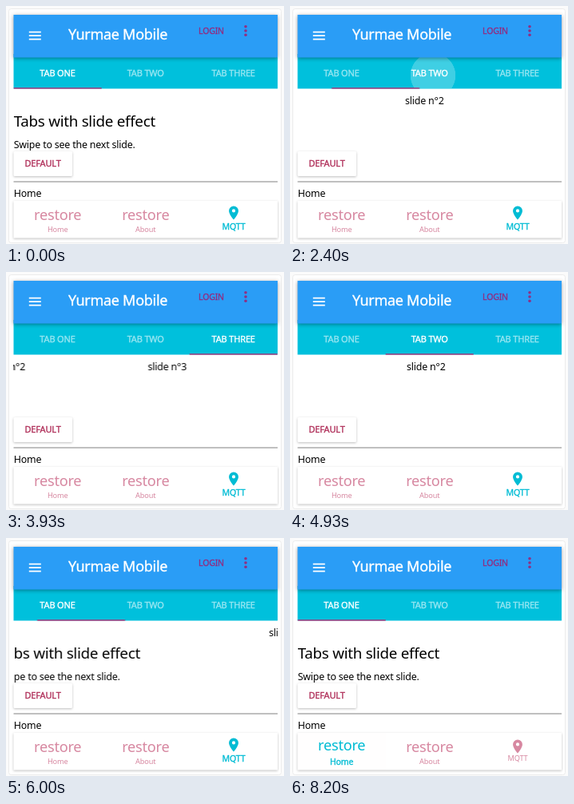
Animation, 348 px wide and 298 px high, one loop 8340 ms. Source, as an HTML page:

```html
<!DOCTYPE html>
<html lang="en">
<head>
<meta charset="utf-8">
<title>Tabs with slide effect</title>
<style>
@property --on { syntax: '<number>'; inherits: true; initial-value: 0; }

html, body { margin: 0; width: 100%; height: 100%; overflow: hidden; background: #fff; }
svg { display: block; width: 100%; height: 100%; }
text { font-family: 'Noto Sans', 'Open Sans', sans-serif; letter-spacing: -.015em; font-size: 12.4px; }
.mid { text-anchor: middle; }
.caps { font-size: 11px; }
.medium { stroke-width: .35px; }

.header { filter: drop-shadow(0 1px 2.5px rgba(0, 0, 0, .4)); }
.raised { filter: drop-shadow(0 1px 1.5px rgba(0, 0, 0, .26)); }

/* every track spans the whole loop */
.strip, .bar, .tabs text, .wave, .item { animation: 8340ms linear infinite; }

.strip { animation-name: strip; }
@keyframes strip {
  0%, 27.58% { transform: translateX(0); }
  28.78% { transform: translateX(-204px); animation-timing-function: ease-out; }
  30.58%, 36.57% { transform: translateX(-202px); }
  38.37% { transform: translateX(-447px); animation-timing-function: ease-out; }
  41.73% { transform: translateX(-404px); }
  44.36% { transform: translateX(-404px); animation-timing-function: ease-in; }
  50.36% { transform: translateX(-290px); animation-timing-function: ease-out; }
  55.16% { transform: translateX(-202px); }
  65.95% { transform: translateX(-202px); animation-timing-function: ease-in; }
  70.14% { transform: translateX(-90px); }
  71.94% { transform: translateX(-19px); animation-timing-function: ease-out; }
  76.74%, 100% { transform: translateX(0); }
}

.bar { animation-name: bar; animation-timing-function: cubic-bezier(.333, .667, .667, 1); }
@keyframes bar {
  0%, 28.01% { transform: translateX(0); }
  31.61%, 37.34% { transform: translateX(110px); }
  40.94%, 50.96% { transform: translateX(220px); }
  54.56%, 70.22% { transform: translateX(110px); }
  73.81%, 100% { transform: translateX(0); }
}

.tabs text { fill: #fff; stroke: #fff; opacity: .6; animation-timing-function: step-end; }
.tabs .one { animation-name: tab-one; }
.tabs .two { animation-name: tab-two; }
.tabs .three { animation-name: tab-three; }
@keyframes tab-one { 0%, 70.22% { opacity: 1; } 27.94% { opacity: .6; } 100% { opacity: 1; } }
@keyframes tab-two { 0%, 37.29%, 70.22%, 100% { opacity: .6; } 27.94%, 50.96% { opacity: 1; } }
@keyframes tab-three { 0%, 50.96%, 100% { opacity: .6; } 37.29% { opacity: 1; } }

.wave { transform-box: fill-box; transform-origin: center; transform: scale(0); }
.w-two { animation-name: wave-two; }
.w-three { animation-name: wave-three; }
.w-about { animation-name: wave-about; }
.w-home { animation-name: wave-home; }
@keyframes wave-two {
  0%, 27.5% { transform: scale(0); opacity: .25; }
  28.78% { transform: scale(.37); opacity: .25; }
  32.37% { transform: scale(.85); opacity: .15; }
  34.77%, 100% { transform: scale(1); opacity: 0; }
}
@keyframes wave-three {
  0%, 35.73% { transform: scale(0); opacity: .25; }
  38.37% { transform: scale(.7); opacity: .18; }
  41.37% { transform: scale(1); opacity: .08; }
  43.17%, 100% { transform: scale(1); opacity: 0; }
}
@keyframes wave-about {
  0%, 79.74% { transform: scale(0); opacity: .1; }
  83.93% { transform: scale(.82); opacity: .035; }
  88.13%, 100% { transform: scale(1); opacity: 0; }
}
@keyframes wave-home {
  0%, 90.29% { transform: scale(0); opacity: .1; }
  94.12% { transform: scale(.82); opacity: .035; }
  98.2%, 100% { transform: scale(1); opacity: .004; }
}

.item {
  --ink: color-mix(in srgb, #00bcd4 calc(var(--on) * 100%), #d788a1);
  fill: var(--ink);
}
.home { animation-name: home; }
.about { animation-name: about; }
.mqtt { animation-name: mqtt; }
@keyframes home { 0%, 90.65% { --on: 0; } 93.2%, 100% { --on: 1; } }
@keyframes about { 0%, 80.34% { --on: 0; } 82.9%, 90.65% { --on: 1; } 93.2%, 100% { --on: 0; } }
@keyframes mqtt { 0%, 80.34% { --on: 1; } 82.9%, 100% { --on: 0; } }
.icon { transform: translateY(calc(var(--on) * -2px)); }
.icon text { font-size: 18.2px; }
.label {
  font-size: 9.2px;
  stroke: var(--ink); stroke-width: calc(var(--on) * .3px);
  transform-box: fill-box; transform-origin: center;
  transform: scale(calc(1 + var(--on) * .15));
}
</style>
</head>
<body>
<svg viewBox="0 0 348 298">
  <defs>
    <clipPath id="view"><rect x="9.5" y="104" width="330.5" height="78"/></clipPath>
    <clipPath id="tab2"><rect x="120" y="64" width="110" height="39"/></clipPath>
    <clipPath id="tab3"><rect x="230" y="64" width="110" height="39"/></clipPath>
    <clipPath id="nav1"><rect x="10" y="244" width="110" height="47"/></clipPath>
    <clipPath id="nav2"><rect x="120" y="244" width="110" height="47"/></clipPath>
  </defs>

  <rect width="348" height="298" fill="#fbfbfb"/>
  <rect x="3.5" y="3.5" width="341" height="293" rx="3" fill="#fff" stroke="#ebebeb"/>

  <g clip-path="url(#view)">
    <g class="strip">
      <text x="9.7" y="151" style="font-size:18.8px">Tabs with slide effect</text>
      <text x="9.7" y="178.3">Swipe to see the next slide.</text>
      <text x="348" y="123">slide n°2</text>
      <text x="550" y="123">slide n°3</text>
    </g>
  </g>

  <g class="tabs">
    <rect x="9.5" y="60" width="330.5" height="43.5" fill="#00c0dc"/>
    <g clip-path="url(#tab2)"><circle class="wave w-two" cx="179" cy="87" r="76" fill="#fff"/></g>
    <g clip-path="url(#tab3)"><circle class="wave w-three" cx="270" cy="84" r="76" fill="#fff"/></g>
    <text class="mid caps medium one" x="64.5" y="87.5">TAB ONE</text>
    <text class="mid caps medium two" x="174.7" y="87.5">TAB TWO</text>
    <text class="mid caps medium three" x="284.7" y="87.5">TAB THREE</text>
    <rect class="bar" x="9.7" y="102.2" width="110" height="1.5" fill="#a83a7c"/>
  </g>

  <g>
    <rect class="header" x="9.5" y="11" width="330.5" height="53.5" fill="#2a9df6"/>
    <path d="M28.8 32.7h15M28.8 37.2h15M28.8 41.7h15" stroke="#fff" stroke-width="1.7"/>
    <text class="medium" x="78" y="42" fill="#fff" stroke="#fff" style="font-size:18px">Yurmae Mobile</text>
    <g fill="#8f2f83">
      <text class="mid caps medium" x="257" y="35" stroke="#8f2f83" style="font-size:10.5px">LOGIN</text>
      <circle cx="300" cy="25.8" r="1.8"/>
      <circle cx="300" cy="31" r="1.8"/>
      <circle cx="300" cy="36.2" r="1.8"/>
    </g>
  </g>

  <rect class="raised" x="9.5" y="182" width="73.5" height="31" rx="1.5" fill="#fff"/>
  <text class="mid caps medium" x="46" y="201" fill="#b0305a" stroke="#b0305a">DEFAULT</text>

  <rect x="9.5" y="219.3" width="330.5" height="1.4" fill="#a6a6a6"/>
  <text x="9.7" y="239">Home</text>

  <rect class="raised" x="9.5" y="244" width="330.5" height="46.5" fill="#fff"/>
  <g clip-path="url(#nav1)"><circle class="wave w-home" cx="65" cy="264" r="76" fill="#e91e63"/></g>
  <g clip-path="url(#nav2)"><circle class="wave w-about" cx="180" cy="262" r="76" fill="#e91e63"/></g>

  <g class="item home">
    <g class="icon"><text class="mid" x="64.7" y="268.3">restore</text></g>
    <text class="mid label" x="64.7" y="283.2">Home</text>
  </g>
  <g class="item about">
    <g class="icon"><text class="mid" x="174.8" y="268.3">restore</text></g>
    <text class="mid label" x="174.8" y="283.2">About</text>
  </g>
  <g class="item mqtt">
    <g class="icon">
      <path fill-rule="evenodd" transform="translate(274.8 250.8) scale(.85)"
        d="M12 2a7 7 0 0 0-7 7c0 5.25 7 13 7 13s7-7.75 7-13a7 7 0 0 0-7-7zm0 9.5a2.5 2.5 0 1 1 0-5 2.5 2.5 0 0 1 0 5z"/>
    </g>
    <text class="mid label" x="285" y="279">MQTT</text>
  </g>
</svg>
</body>
</html>
```
